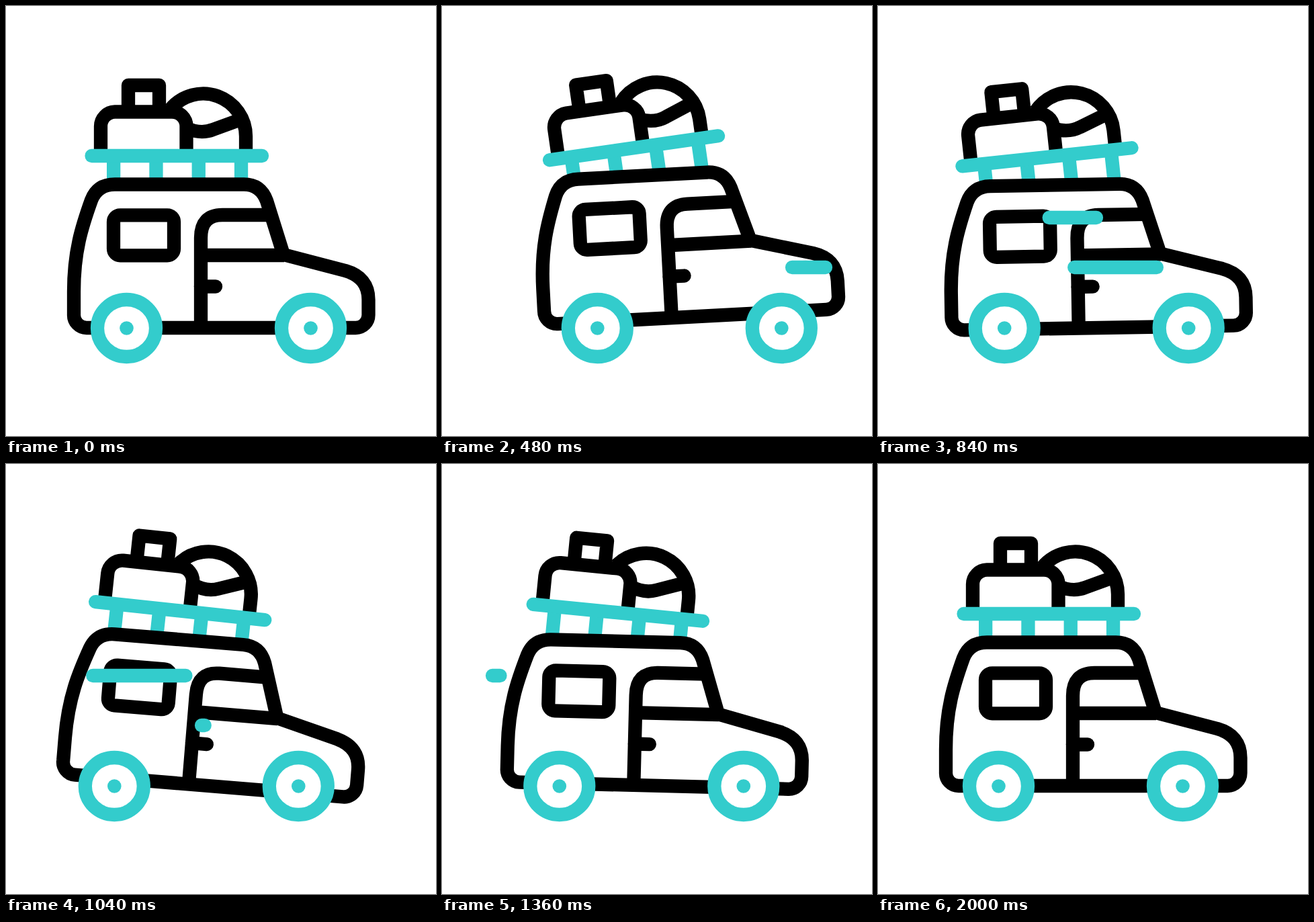
Animation of 640x640 px, one loop 2080 ms. Source, as an HTML page:

```html
<!DOCTYPE html>
<html lang="en">
<head>
<meta charset="utf-8">
<title>Loaded car</title>
<style>
  html, body { margin: 0; width: 100%; height: 100%; overflow: hidden; background: #fff; }
  svg { display: block; width: 100vw; height: 100vh; }
  .ink, .teal { fill: none; stroke: #000; stroke-width: 20.3; stroke-linejoin: round; }
  .teal { stroke: #33cccc; }
  .round { stroke-linecap: round; }
  .white { fill: #fff; }
  #legs { stroke-width: 52; stroke-dasharray: 20.3 43; }
</style>
</head>
<body>
<svg viewBox="0 0 640 640">
  <defs>
    <g id="wheel">
      <ellipse class="teal white" rx="43.5" ry="42.5"/>
      <circle r="10.3" fill="#33cccc"/>
    </g>
  </defs>

  <g id="luggage">
    <path class="ink" d="M245 153A63.5 63.5 0 0 1 357 194V214"/>
    <path class="ink" d="M269 182Q290 191 308 184L352 168"/>
    <path class="ink white" d="M141 214V179A21.5 21.5 0 0 1 162 157.5H247A21.5 21.5 0 0 1 268.5 179V214"/>
    <path class="ink" d="M182 157V118H228V157"/>
    <path class="teal" id="legs" d="M150 249H361"/>
    <path class="teal round" d="M127.5 223H381"/>
  </g>

  <g id="body">
    <path class="ink white" d="M101 459V425C101 365 113 328 127 289Q136 265.500 162 265.500H354Q379 265.500 388 290L413 370L505 394Q539.500 404 539.500 437V460A19 19 0 0 1 520.500 479H120A19 19 0 0 1 101 459Z"/>
    <path class="ink" d="M290 479V345Q290 311 322 311H393M290 371H414"/>
    <path class="ink round" d="M290 417.5H312"/>
    <rect class="ink" x="160" y="311.3" width="90" height="60" rx="10"/>
  </g>

  <g id="wheels">
    <use href="#wheel" x="179.5" y="479.5"/>
    <use href="#wheel" x="453.5" y="479.5"/>
  </g>

  <path id="lowGust" class="teal round"/>
  <path id="highGust" class="teal round"/>
</svg>
<script>
  const LOOP = 2080, STEP = 40;
  const el = id => document.getElementById(id);

  const progress = (t, from, to) => Math.min(1, Math.max(0, (t - from) / (to - from)));

  // Smooth rise from 0 to 1.
  function ease(t, from, to) {
    const p = progress(t, from, to);
    return p * p * (3 - 2 * p);
  }

  // Smooth rise to 1 and back to 0.
  const bump = (t, from, to) => Math.sin(Math.PI * progress(t, from, to)) ** 2;

  // Forward, back past the start, then home.
  const drive = t => 53.3 * ease(t, 120, 520) - 71.5 * ease(t, 560, 1040) + 18.2 * ease(t, 1040, 1520);

  const hop = t => -16.5 * bump(t, 150, 800) - 7 * bump(t, 1050, 1380);

  // Nose up, nose down, a small rebound, level.
  const tilt = t => -5 * ease(t, 215, 680) + 9.7 * ease(t, 680, 1040)
    - 6.5 * ease(t, 1040, 1680) + 1.8 * ease(t, 1680, 1880);

  // The load lags behind the body and swings further.
  const sway = t => -13.4 * ease(t, 266, 640) + 23.4 * ease(t, 640, 1180)
    - 14.8 * ease(t, 1180, 1680) + 4.8 * ease(t, 1680, 2000);

  // A line grows leftwards, then its right end catches up.
  function gust(node, t, start, lag, span, from, length, y) {
    const left = from - length * ease(t, start, start + span);
    const right = from - length * ease(t, start + lag, start + lag + span);
    node.setAttribute('d', right - left > 0.5 ? `M${left} ${y}H${right}` : '');
  }

  function draw(t) {
    const x = drive(t), lean = tilt(t);
    const chassis = `translate(${x} ${hop(t)}) rotate(${lean} 320 479)`;
    el('wheels').setAttribute('transform', `translate(${x} 0)`);
    el('body').setAttribute('transform', chassis);
    el('luggage').setAttribute('transform', `${chassis} rotate(${sway(t) - lean} 257 303)`);
    gust(el('lowGust'), t, 340, 220, 520, 571, 280, 389);
    gust(el('highGust'), t, 640, 222, 572, 325, 250, 315);
  }

  const begin = performance.now();
  function tick() {
    const t = (performance.now() - begin) % LOOP;
    draw(Math.floor(t / STEP) * STEP);
    requestAnimationFrame(tick);
  }
  tick();
</script>
</body>
</html>
```
